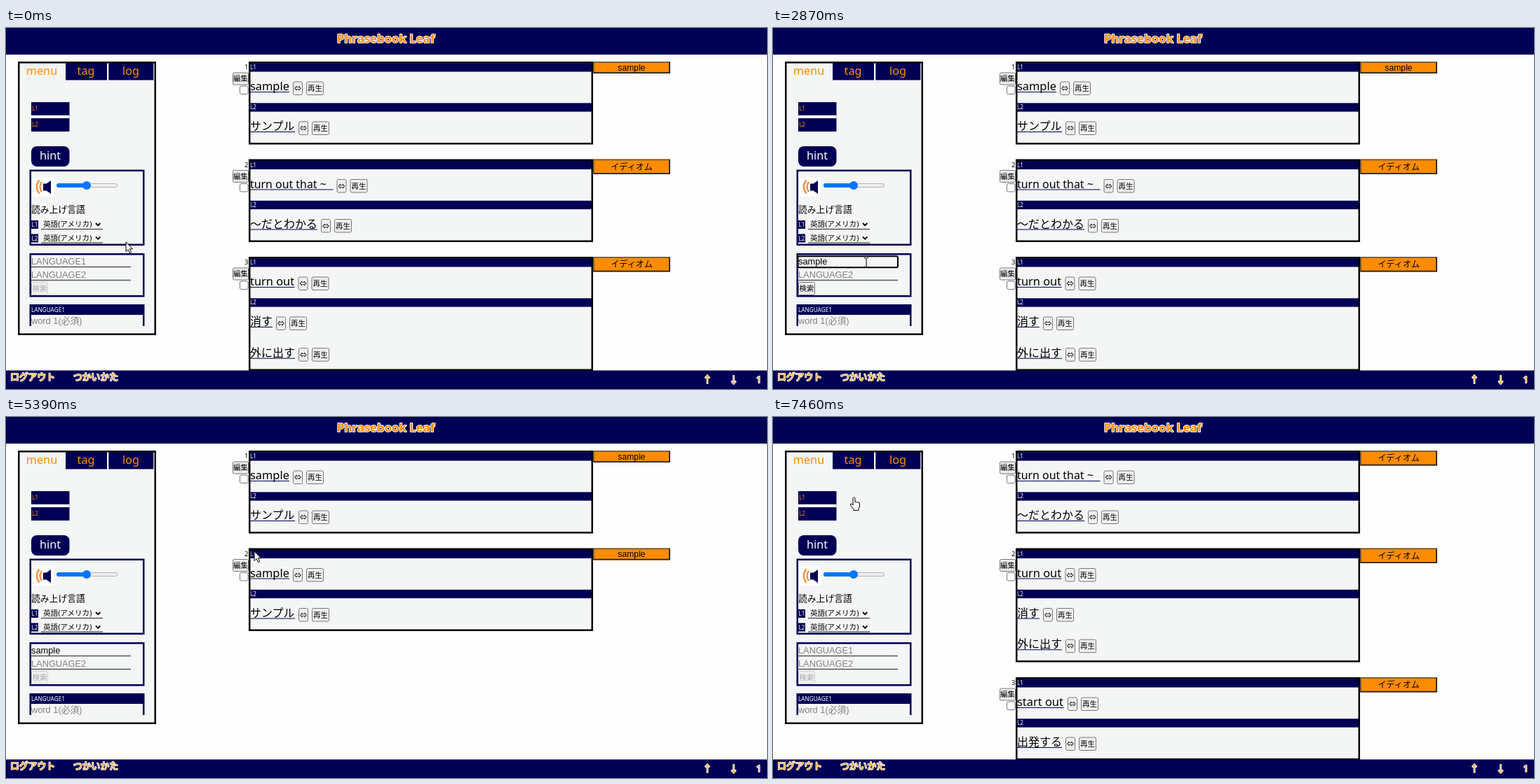
Recreate the animation shown at these times as an HTML page. Size 1085 by 516 pixels, loop 7850 ms.

```html
<!DOCTYPE html>
<html lang="ja">
<head>
<meta charset="utf-8">
<style>
html, body { margin: 0; width: 100%; height: 100%; overflow: hidden; background: #fefefe; }
svg { display: block; width: 1085px; height: 516px; cursor: default; }
text { font-family: 'Noto Sans', 'Noto Sans CJK JP', 'Noto Sans CJK', sans-serif; white-space: pre; }
.ui { font-family: 'Liberation Sans', 'Noto Sans CJK JP', 'Noto Sans CJK', sans-serif; }
.glow { fill: #ff8c00; stroke: #fff; stroke-width: 2px; stroke-linejoin: round; paint-order: stroke; }
</style>
</head>
<body>
<svg viewBox="0 0 1085 516">
  <g id="cards"></g>
  <g id="side"></g>
  <g id="bars"></g>
  <g id="cursor"><path id="shape" stroke-linejoin="round"/></g>
</svg>
<script>
const LOOP = 7850, NAVY = '#000054', ORANGE = '#ff8c00', PANEL = '#f4f5f5';
const $ = id => document.getElementById(id);

const rect = (x, y, w, h, fill, extra = '') =>
  `<rect x="${x}" y="${y}" width="${w}" height="${h}" fill="${fill}" ${extra}/>`;
const frame = (x, y, w, h, color, fill = 'none', line = 2.5) =>
  rect(x + line / 2, y + line / 2, w - line, h - line, fill, `stroke="${color}" stroke-width="${line}"`);
const text = (x, y, size, str, fill = '#000', extra = '') =>
  `<text x="${x}" y="${y}" font-size="${size}" fill="${fill}" ${extra}>${str}</text>`;
const line = (x1, x2, y, color, w = 1) =>
  `<path d="M${x1} ${y}H${x2}" stroke="${color}" stroke-width="${w}"/>`;
const MID = 'text-anchor="middle"', UI = 'class="ui"';

function button(x, y, w, h, label, enabled = true) {
  return rect(x + .5, y + .5, w - 1, h - 1, '#efefef', `rx="2" stroke="${enabled ? '#767676' : '#d0d0d0'}"`) +
    text(x + w / 2, y + h / 2 + 3.9, 10.4, label, enabled ? '#000' : '#a9a9a9', MID);
}

const checkbox = (x, y) => rect(x + .5, y + .5, 11.5, 11.5, '#fff', 'rx="2" stroke="#767676"');

function tag(x, y, label, w = 110, pressed = false) {
  const h = label === 'sample' ? 17 : 21.5;
  const edge = (d, c) => `<path d="${d}" fill="none" stroke="${c}" stroke-width="1.8"/>`;
  const [a, b] = pressed ? ['#212121', '#767676'] : ['#6b5a3c', '#212121'];
  return rect(x, y, w, h, ORANGE) +
    edge(`M${x + .9} ${y + h}V${y + .9}H${x + w}`, a) +
    edge(`M${x + w - .9} ${y + 1}V${y + h - .9}H${x + 1}`, b) +
    text(x + w / 2, y + h / 2 + 4.3, 12.2, label, '#000', UI + MID.padStart(MID.length + 1));
}

// Each word carries the width of its underline; the buttons follow it.
const SAMPLE = { tag: 'sample', l1: ['sample', 56], l2: [['サンプル', 64]] };
const THAT = { tag: 'イディオム', l1: ['turn out that ~', 118.5], l2: [['〜だとわかる', 96]] };
const TURN = { tag: 'イディオム', l1: ['turn out', 63.5], l2: [['消す', 32], ['外に出す', 64]] };
const START = { tag: 'イディオム', l1: ['start out', 67], l2: [['出発する', 64]] };

function word([str, w], y, size, shift = 0) {
  const x = 348 + w + 5 + shift;
  return text(348, y, size, str) + line(348, 348 + w, y + 2.5, NAVY) +
    button(x, y - 12.5, 14, 19.5, '⇔') + button(x + 19, y - 12.5, 25, 19.5, '再生');
}

function card(data, y, i) {
  const h = 118.5 + 44.5 * (data.l2.length - 1);
  const bar = (dy, label) => rect(347, y + dy, 488, 12.3, NAVY) +
    text(348, y + dy + 9, 8.2, label, '#fff');
  return text(345.5, y + 11, 9.6, i + 1, '#000', 'text-anchor="end"') +
    button(323, y + 15.5, 23, 18, '編集') + checkbox(333, y + 34.5) +
    rect(346, y, 491, h, PANEL) + bar(2.2, 'L1') + bar(59.3, 'L2') +
    word(data.l1, y + 41, data.l1[1] > 100 ? 15.9 : 16.4) +
    data.l2.map((w, k) => word(w, y + 98 + 44.7 * k, 16)).join('') +
    frame(346, y, 491, h, '#000') + tag(837, y, data.tag);
}

function cardList(list) {
  let y = 48, out = '';
  list.forEach((data, i) => {
    out += card(data, y, i);
    y += 139.5 + 45 * (data.l2.length - 1);
  });
  return out;
}

function tabs(active) {
  return [['menu', 19, 65, 51], ['tag', 85, 59, 114], ['log', 146.3, 64, 178]].map(([name, x, w, cx]) => {
    const on = name === active;
    return rect(x, 50, w, 24.5, on ? PANEL : NAVY) + text(cx, 67, 16.2, name, ORANGE, MID);
  }).join('');
}

function language(label, y) {
  return rect(36, y - 9, 10, 12, NAVY) + text(41, y, 8, label, '#fff', MID) +
    text(53, y, 10.6, '英語(アメリカ)') +
    `<path d="M128 ${y - 5}l3.2 3.2 3.2-3.2" fill="none" stroke="#000" stroke-width="1.8"/>` +
    line(50, 138, y + 3.5, '#222');
}

function menu({ typed, caret, focus, ready }) {
  const field = (y, value, hint) => text(36, y, 12.8, value || hint, value ? '#000' : '#808080', UI + ` id="f${y}"`);
  return rect(36, 106, 54.5, 42, NAVY) + rect(36, 124.8, 54.5, 4.2, '#fff') +
    text(37, 118, 8.2, 'L1', ORANGE) + text(37, 141, 8.2, 'L2', ORANGE) +
    rect(36, 169, 54.5, 29, NAVY, 'rx="8"') + text(63, 188, 16.2, 'hint', '#fff', MID) +
    frame(33.5, 202.5, 164, 108.5, NAVY) + rect(38, 214, 30, 27, '#fff') +
    `<path d="M53 222.5h4.5l6.5-4.5v19l-6.5-4.5H53z" fill="${NAVY}"/>
     <path d="M51 220q-5 7 0 14M47.5 217.500q-7.500 9.500 0 19" fill="none" stroke="#f08a3c" stroke-width="2.2"/>` +
    rect(72.5, 222.5, 86, 5, '#efefef', 'rx="2.500" stroke="#b2b2b2"') +
    rect(72, 222, 43, 6, '#0075ff', 'rx="3"') + '<circle cx="115" cy="225" r="6" fill="#0075ff"/>' +
    text(36, 264, 12.8, '読み上げ言語') + language('L1', 284) + language('L2', 303.5) +
    frame(33.5, 322, 164, 62.5, NAVY) +
    (focus ? rect(35.5, 326.300, 142.5, 16, PANEL, 'rx="2" stroke="#000" stroke-width="2"') : line(36, 178, 341.5, '#555', 1.5)) +
    field(338, typed, 'LANGUAGE1') + (caret ? rect(0, 328, 1, 13, '#000', 'id="caret"') : '') +
    field(357, '', 'LANGUAGE2') + line(36, 178, 360.5, '#555', 1.5) +
    button(36, 363, 24, 19, '検索', ready) +
    rect(33.5, 395, 164, 15, NAVY) + rect(33.5, 410, 2.5, 16, NAVY) + rect(195, 410, 2.5, 16, NAVY) +
    text(36, 406, 8.2, 'LANGUAGE1', '#fff') + text(36, 423, 12.8, 'word 1(必須)', '#808080', UI);
}

const tagMenu = pressed => checkbox(41.5, 115.5) + tag(69, 111, 'イディオム', 109, pressed) +
  checkbox(41.5, 141) + tag(69, 138.5, 'sample', 109);

function sidebar(s) {
  return rect(17, 48, 197, 391, PANEL) + rect(19, 50, 192.5, 24.5, '#fff') + tabs(s.tab) +
    (s.tab === 'menu' ? menu(s) : tagMenu(s.pressed)) + frame(17, 48, 197, 391, '#000');
}

// Cursor runs: first step, last step, number of steps, goal x, goal y.
const MOVES = [
  [70, 430, 6, 133, 335], [3200, 3950, 12, 31, 374], [4030, 4170, 3, 40, 377.5],
  [4230, 4230, 1, 34, 367], [4760, 5240, 8, 382, 203], [5390, 5390, 1, 354, 192],
  [5450, 6130, 10, 108.500, 68], [6390, 6850, 7, 115.500, 115]
];
const KEYS = [1360, 1560, 1690, 1890, 2160, 2340];

function cursorAt(t) {
  let x = 171, y = 306;
  for (const [a, b, n, gx, gy] of MOVES) {
    if (t < a) break;
    const step = n > 1 ? Math.min(n, 1 + Math.floor((t - a) / (b - a) * (n - 1) + 1e-6)) : 1;
    const p = step / n, e = n > 3 ? p * p * (3 - 2 * p) : p;
    x += (gx - x) * e;
    y += (gy - y) * e;
  }
  return [x, y];
}

const SHAPES = {
  arrow: ['M0 0V13.500L3.200 10.600L5.400 15.500L7.600 14.500L5.500 9.800H9.500Z', '#fff', 1],
  beam: ['M-3-6.500H-1L0-5.500L1-6.500H3M0-5.500V5.500M-3 6.500H-1L0 5.500L1 6.500H3', 'none', 1],
  hand: ['M-1.500 11V1.500Q-1.500 0 0 0T1.500 1.500V6.500Q3-.500 + 0'.replace('Q3-.500 + 0', 'Q3 5.500 4 7Q5.500 6 6.500 7.500Q8 7 8 9V13L6.500 16V18.500H-.500V16.500L-5 11Q-5.500 8.500-3.500 9Z'), '#fff', 1]
};

function stateAt(t) {
  const count = t < 7460 ? KEYS.filter(k => k <= t).length : 0;
  const searched = t >= 4230;
  return {
    tab: t >= 6130 && t < 7460 ? 'tag' : 'menu',
    typed: 'sample'.slice(0, count),
    caret: count > 0 && t - KEYS[count - 1] < 530,
    focus: t >= 630 && t < 4100,
    ready: count > 0 && !searched,
    pressed: t >= 7130 && t < 7260,
    list: t >= 7460 ? 2 : searched ? 1 : 0
  };
}

const LISTS = [[SAMPLE, THAT, TURN], [SAMPLE, SAMPLE], [THAT, TURN, START]];
let sideKey, listKey;

function draw(t) {
  const s = stateAt(t), key = JSON.stringify(s);
  if (s.list !== listKey) $('cards').innerHTML = cardList(LISTS[listKey = s.list]);
  if (key !== sideKey) {
    sideKey = key;
    $('side').innerHTML = sidebar(s);
    if (s.caret) $('caret').setAttribute('x', 36 + $('f338').getComputedTextLength());
  }
  const [x, y] = cursorAt(t);
  const overField = s.tab === 'menu' && t < 4230 && x > 36 && x < 178 && y > 325 && y < 361;
  const kind = overField ? 'beam' : t >= 6390 && y > 111 ? 'hand' : 'arrow';
  const [d, fill, w] = SHAPES[kind], shape = $('shape');
  shape.setAttribute('d', d);
  shape.setAttribute('fill', fill);
  shape.setAttribute('stroke', '#000');
  shape.setAttribute('stroke-width', w);
  $('cursor').setAttribute('transform', `translate(${x} ${y})`);
}

const glow = (x, y, size, str, extra = '') => text(x, y, size, str, ORANGE, 'class="glow" ' + extra);
$('bars').innerHTML = rect(0, 0, 1085, 38, NAVY) + rect(0, 489.5, 1085, 27, NAVY) +
  glow(541.5, 21, 16.8, 'Phrasebook Leaf', MID + ' font-weight="700"') +
  glow(6, 503, 12.8, 'ログアウト') + glow(96, 503, 12.8, 'つかいかた') +
  glow(1000, 507, 13, '↑', MID) + glow(1037.5, 507, 13, '↓', MID) + glow(1073.5, 507, 12.8, '1', MID);

const begin = performance.now();
function tick() {
  draw((performance.now() - begin) % LOOP);
  requestAnimationFrame(tick);
}
tick();
</script>
</body>
</html>
```
